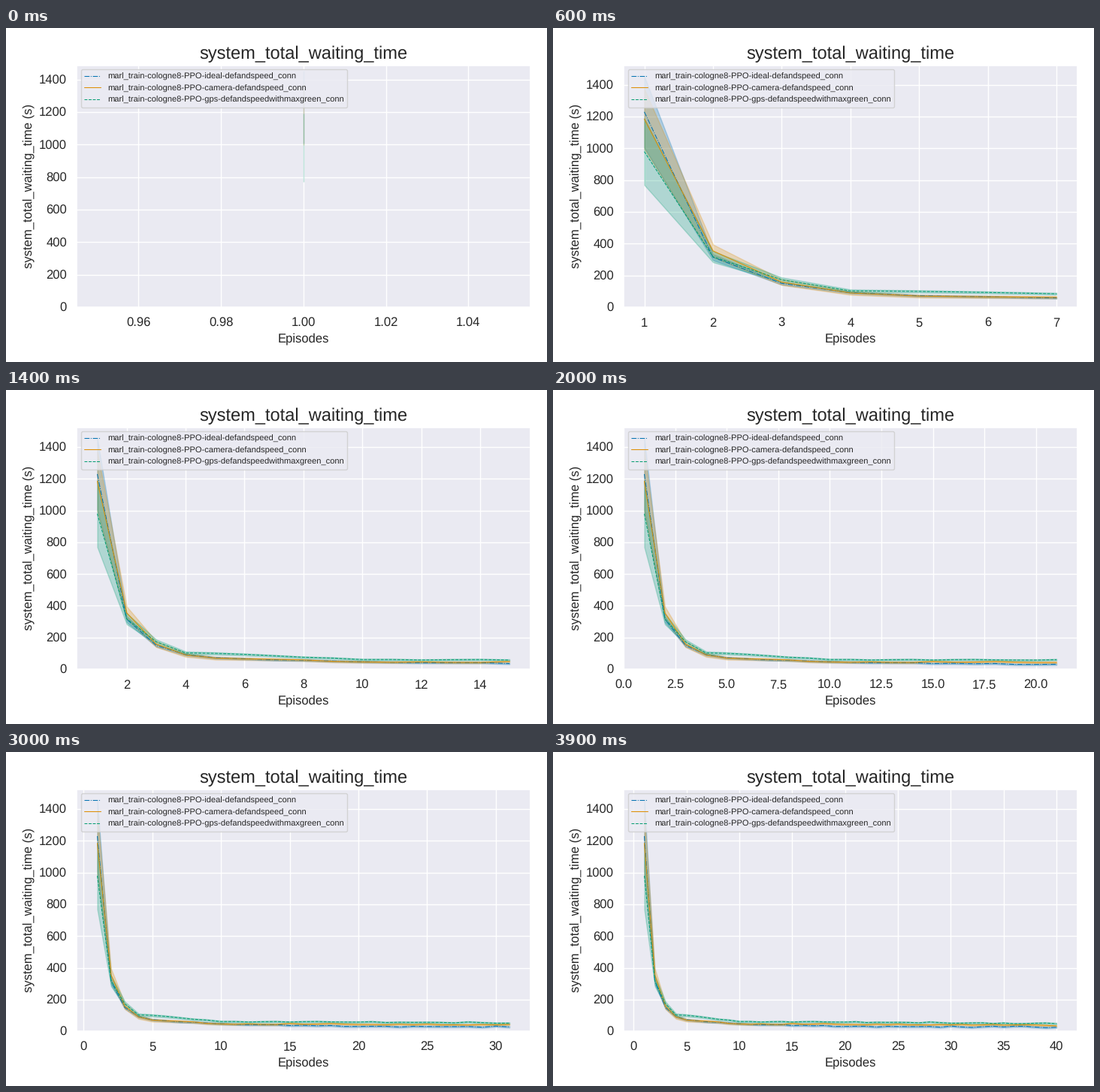
A matplotlib script for the animation above (4000 ms loop, 720x445 px).

```python
import matplotlib.pyplot as plt
import numpy as np
from matplotlib.animation import FuncAnimation

EPISODES = 40
INK = ".15"

plt.rcParams.update({
    "figure.figsize": (7.2, 4.45),
    "figure.dpi": 100,
    "figure.facecolor": "white",
    "font.family": "Liberation Sans",
    "font.size": 15,
    "text.color": INK,
    "text.hinting": "no_hinting",
    "axes.facecolor": "#EAEAF2",
    "axes.edgecolor": "white",
    "axes.linewidth": 1.25,
    "axes.labelcolor": INK,
    "axes.labelsize": 12,
    "axes.titlesize": 17,
    "axes.axisbelow": True,
    "axes.grid": True,
    "grid.color": "white",
    "grid.linewidth": 1,
    "lines.linewidth": 0.75,
    "lines.solid_capstyle": "round",
    "patch.linewidth": 1,
    "legend.fontsize": 8,
    "xtick.bottom": False,
    "ytick.left": False,
})
for axis in ("xtick", "ytick"):
    plt.rcParams.update({
        f"{axis}.color": INK,
        f"{axis}.labelsize": 12,
        f"{axis}.major.size": 6,
        f"{axis}.major.pad": 3.5,
    })

rng = np.random.default_rng(8)
episodes = np.arange(1, EPISODES + 1)
KEYS = [1, 2, 3, 4, 5, 10, 20, 40]


def waiting_time(values):
    """Mean curve through the key episodes, jittering once it has settled."""
    jitter = rng.normal(0, 2, EPISODES) * (episodes > 5)
    return np.interp(episodes, KEYS, values) + jitter


def spread(first, power):
    """Band half-width, decaying from its first value to a constant."""
    return 5 + (first - 5) * episodes ** -power


# name, colour, line style, mean, half-width of the band
SERIES = [
    ("ideal-defandspeed", "#0173B2", "-.",
     waiting_time([1230, 315, 150, 92, 72, 44, 31, 28]), spread(224, 4.0)),
    ("camera-defandspeed", "#DE8F05", "-",
     waiting_time([1185, 355, 158, 90, 70, 47, 43, 38]), spread(190, 2.4)),
    ("gps-defandspeedwithmaxgreen", "#029E73", "--",
     waiting_time([980, 318, 173, 103, 100, 62, 59, 48]), spread(210, 2.8)),
]

fig, ax = plt.subplots()
fig.set_layout_engine("tight", rect=(0, 0, 1, 0.997))


def draw(frame):
    n = frame + 1
    x = episodes[:n]
    ax.clear()
    for name, color, style, mean, dev in SERIES:
        y, d = mean[:n], dev[:n]
        ax.plot(x, y, style, color=color,
                label=f"marl_train-cologne8-PPO-{name}_conn")
        ax.fill_between(x, y + d, y - d, color=color, alpha=0.25)
    ax.set_title("system_total_waiting_time")
    ax.set_xlabel("Episodes")
    ax.set_ylabel("system_total_waiting_time (s)")
    ax.set_ylim(bottom=0)
    ax.legend(loc="upper left")
    return ax.get_children()


anim = FuncAnimation(fig, draw, frames=EPISODES, interval=100,
                     init_func=lambda: draw(0), repeat=True, repeat_delay=0)
plt.show()
```
